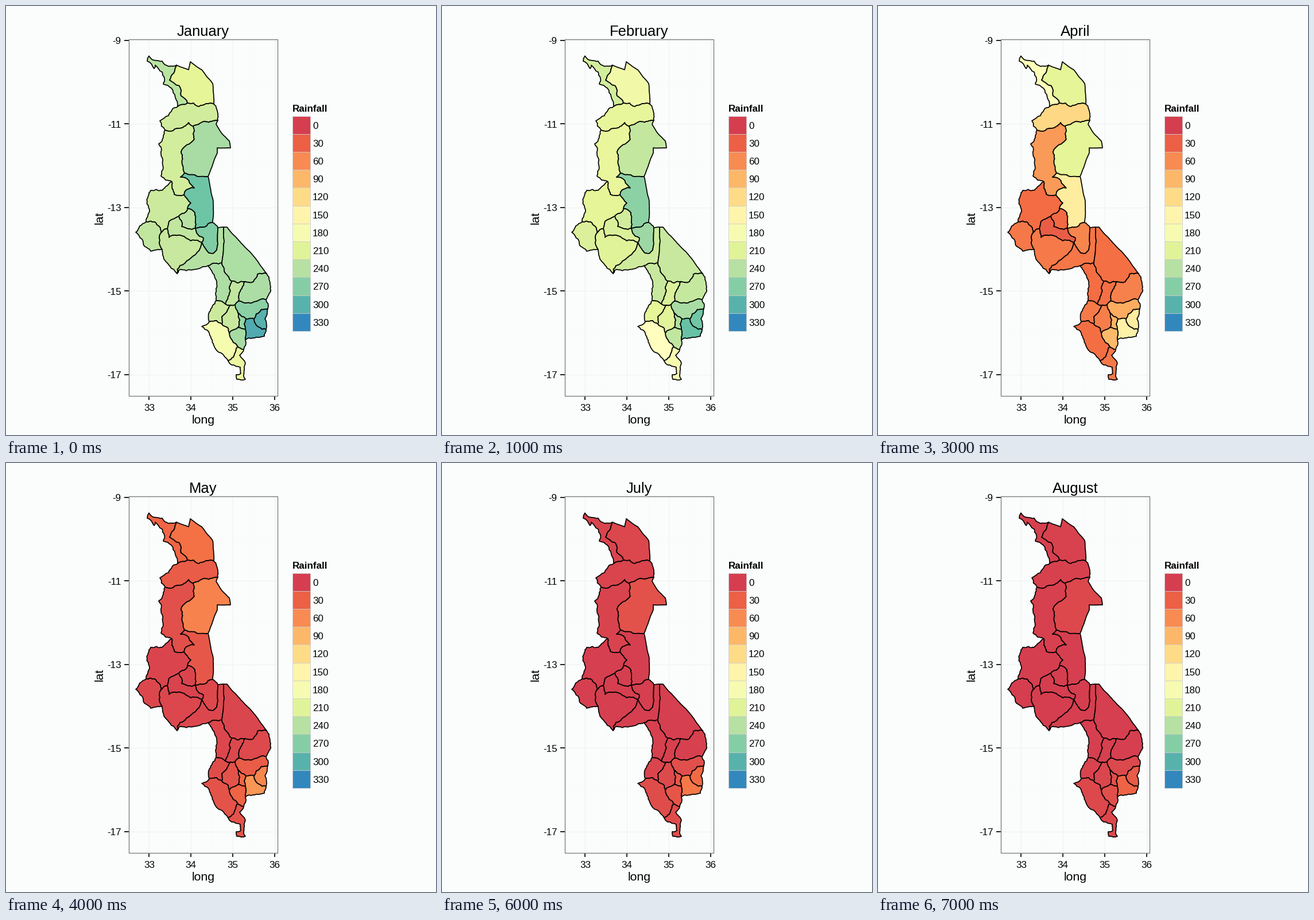
Recreate the animation shown at these times as a matplotlib script. Size 749 by 747 pixels, loop 8000 ms.

```python
import random

import numpy as np
import matplotlib.pyplot as plt
from matplotlib.animation import FuncAnimation
from matplotlib.collections import LineCollection, PolyCollection
from matplotlib.colors import LinearSegmentedColormap
from matplotlib.patches import Rectangle

W, H, DPI = 749, 747, 100
PX = 72 / DPI  # points per pixel
BACK = "#fbfdfc"
MONTHS = ["January", "February", "March", "April",
          "May", "June", "July", "August"]
SPECTRAL = ["#d53e4f", "#f46d43", "#fdae61", "#fee08b", "#ffffbf",
            "#e6f598", "#abdda4", "#66c2a5", "#3288bd"]
RAMP = LinearSegmentedColormap.from_list("rain", SPECTRAL, N=661)
MAX_RAIN = 330
LAKE = {"ad", "ek", "kl", "vt", "xw", "wv", "Bw"}  # smooth borders

rng = random.Random(7)
nodes = {}
lines = {}
shapes = []
rain = []


def place(names, *xy):
    """Name the points where borders meet, one letter each."""
    nodes.update(zip(names, zip(xy[::2], xy[1::2])))


def wiggle(p, q, rough):
    """Points from p up to, but without, q along a rugged line."""
    dx, dy = q[0] - p[0], q[1] - p[1]
    if np.hypot(dx, dy) < 5:
        return [p]
    k = rng.uniform(-rough, rough)
    mid = ((p[0] + q[0]) / 2 - dy * k, (p[1] + q[1]) / 2 + dx * k)
    return wiggle(p, mid, rough) + wiggle(mid, q, rough)


def border(ends, *xy):
    """Draw a border between two nodes through some key points."""
    pts = [nodes[ends[0]], *zip(xy[::2], xy[1::2]), nodes[ends[1]]]
    rough = 0.03 if ends in LAKE else 0.15
    line = []
    for p, q in zip(pts, pts[1:]):
        line += wiggle(p, q, rough)
    lines[ends] = line + [pts[-1]]


def edge(p, q):
    if q + p in lines:
        return lines[q + p][::-1]
    if p + q not in lines:
        border(p + q)
    return lines[p + q]


# Long, wide and strength of the wet places in the dry season
SPOTS = [(442, 560, 22, 50), (345, 248, 28, 26),
         (325, 130, 50, 14), (385, 600, 50, 15)]


def district(ring, jan, mar, apr):
    """Close a ring of nodes and work out its rain for all months."""
    shape = []
    for p, q in zip(ring, ring[1:] + ring[0]):
        shape += edge(p, q)[:-1]
    shapes.append(shape)
    x, y = np.mean(shape, axis=0)
    june = 1 + sum(amp * np.exp(-((x - cx) ** 2 + (y - cy) ** 2) / 2 / s ** 2)
                   for cx, cy, s, amp in SPOTS)
    may = june + 0.15 * (apr - june)
    south = (y - 90) / 560
    july = june * (0.5 + 0.5 * south)
    august = june * (0.2 + 0.5 * south)
    rain.append((jan, jan - 18, mar, apr, may, june, july, august))


# North
place("abcdefghij", 297, 103, 316, 169, 299, 175, 362, 171, 369, 199,
      326, 209, 277, 216, 289, 306, 310, 329, 311, 291)
place("klmnopqrstu", 352, 297, 360, 377, 330, 387, 316, 353, 301, 366,
      281, 388, 270, 395, 244, 376, 272, 424, 341, 412, 298, 466)
border("ac", 283, 105, 272, 96, 249, 87, 246, 96, 258, 109, 260, 103,
       272, 115, 274, 136, 288, 143)
border("ab", 285, 129, 302, 139)
border("ad", 318, 111, 321, 97, 341, 111, 360, 135, 361, 149)
border("db", 336, 175)
border("de", 369, 187)
border("ef", 358, 201, 338, 204)
border("fg", 318, 203, 300, 213)
border("gc", 268, 200, 283, 191)
border("fj", 328, 232, 305, 254, 308, 278)
border("ji", 304, 298, 328, 317, 311, 324)
border("ih", 293, 328)
border("hg", 270, 296, 272, 264, 266, 240)
border("ek", 366, 206, 376, 222, 389, 235, 391, 247, 368, 247, 368, 256)
border("kj", 335, 297)

# Centre
place("vwxyzAB", 369, 386, 379, 385, 376, 447, 352, 452, 393, 479,
      416, 480, 454, 466)
border("in", 322, 343)
border("op", 284, 375)
border("qr", 259, 376)
border("rh", 250, 358, 248, 330, 252, 321, 272, 321)
border("kl", 361, 340)
border("mn", 329, 360)
border("om", 306, 384)
border("pt", 284, 403, 306, 400, 322, 409)
border("tm", 344, 404, 332, 395)
border("vt", 369, 414, 367, 425, 361, 431, 353, 430)
border("rs", 226, 394, 237, 406, 252, 427)
border("sq", 268, 408)
border("su", 274, 436)
border("ut", 303, 452, 333, 429)
border("uy", 301, 460)
border("xw", 380, 410)

# South
place("CDEFGHIJKL", 453, 511, 405, 514, 399, 520, 391, 521, 382, 519,
      366, 513, 354, 550, 376, 554, 389, 570, 404, 534)
place("MNOPQRSTUV", 418, 545, 432, 545, 456, 527, 453, 563, 404, 560,
      417, 563, 417, 582, 403, 592, 414, 598, 387, 618)
border("yH", 363, 470, 365, 500)
border("Gz", 389, 500)
border("zx", 380, 460)
border("AB", 431, 480, 438, 467)
border("Bw", 430, 434, 385, 385)
border("AD", 411, 492)
border("BC", 458, 472, 461, 489)
border("CD", 432, 515)
border("ON", 436, 536)
border("FJ", 376, 541)
border("JI", 367, 548)
border("IH", 354, 533)
border("JK", 386, 560)
border("NP", 440, 559)
border("SP", 423, 578, 450, 575)
border("TK", 391, 578)
border("IV", 341, 558, 353, 567, 362, 591)
border("VT", 400, 602)
border("UV", 407, 608, 417, 622, 417, 650, 402, 650, 401, 642, 409, 640,
       408, 629, 393, 625)

# Nodes around each area, with its rain in January, March and April
district("acb", 238, 248, 172)
district("adb", 206, 283, 207)
district("cbdefg", 221, 206, 117)
district("gfjih", 220, 166, 70)
district("fekj", 249, 293, 207)
district("hinopqr", 225, 140, 40)
district("ijklmn", 284, 282, 140)
district("nom", 239, 152, 38)
district("optm", 232, 142, 27)
district("mlvt", 274, 156, 57)
district("qrs", 232, 139, 48)
district("pqsut", 228, 140, 49)
district("tuyxwv", 241, 154, 47)
district("xyHGz", 246, 143, 41)
district("xzABw", 246, 156, 43)
district("zADEFG", 232, 150, 43)
district("ABCD", 247, 190, 54)
district("DCONMLE", 267, 209, 81)
district("HGFJI", 225, 151, 49)
district("EFJKQL", 227, 153, 52)
district("LMRQ", 260, 203, 88)
district("ONP", 301, 270, 140)
district("NMRSP", 306, 275, 147)
district("KQRSUT", 250, 206, 92)
district("JIVTK", 182, 112, 42)
district("VTU", 198, 140, 48)

tints = RAMP(np.array(rain).T / MAX_RAIN)

plt.rcParams["font.family"] = "Liberation Sans"
fig = plt.figure(figsize=(W / DPI, H / DPI), dpi=DPI, facecolor=BACK)
ax = fig.add_axes([0, 0, 1, 1])
ax.set(xlim=(0, W), ylim=(H, 0))
ax.axis("off")

BASE = 21.33
SMALL = 0.8 * BASE


def label(x, y, text, size=SMALL, ha="center", **more):
    return ax.text(x, y, text, fontsize=size * PX, ha=ha, va="baseline",
                   color="black", **more)


def rules(segments, color, width):
    ax.add_collection(LineCollection(segments, colors=color,
                                     linewidths=width * PX))


# Panel, grid and axes
LEFT, RIGHT, TOP, BOTTOM = 214, 473, 58, 679
xs = [249.3 + 72.8 * i for i in range(4)]
ys = [60 + 145.4 * i for i in range(5)]
for shift, tone, width in [(0.5, "#f8faf9", 1), (0, "#f1f3f2", 1.2)]:
    gx = [x - 72.8 * shift for x in xs]
    gy = [y + 145.4 * shift for y in ys]
    rules([[(x, TOP), (x, BOTTOM)] for x in gx if x > LEFT], tone, width)
    rules([[(LEFT, y), (RIGHT, y)] for y in gy if y < BOTTOM], tone, width)

areas = PolyCollection(shapes, facecolors=tints[0], edgecolors="black",
                       linewidths=1.7 * PX, joinstyle="round", zorder=3)
ax.add_collection(areas)
ax.add_patch(Rectangle((LEFT, TOP), RIGHT - LEFT, BOTTOM - TOP, fill=False,
                       edgecolor="#808080", linewidth=1.4 * PX, zorder=4))

rules([[(x, BOTTOM), (x, BOTTOM + 7)] for x in xs], "black", 1.7)
rules([[(LEFT - 8, y), (LEFT, y)] for y in ys], "black", 1.7)
for i, x in enumerate(xs):
    label(x, 705, str(33 + i))
for i, y in enumerate(ys):
    label(200.5, y + 6.3, str(-9 - 2 * i), ha="right")
label(343.5, 727, "long", BASE)
label(169, 368.5, "lat", BASE, rotation=90, rotation_mode="anchor")
title = label(343.5, 52, MONTHS[0], 1.2 * BASE)

# Legend
label(499, 184.5, "Rainfall", ha="left", weight="bold")
KEY = 31.2
for i in range(12):
    top = 191.5 + KEY * i
    ax.add_patch(Rectangle((499, top), KEY, KEY, edgecolor="#cccccc",
                           facecolor=RAMP(30 * i / MAX_RAIN),
                           linewidth=0.8 * PX))
    label(534, top + KEY / 2 + 6.4, str(30 * i), ha="left")


def draw(month):
    areas.set_facecolor(tints[month])
    title.set_text(MONTHS[month])
    return areas, title


anim = FuncAnimation(fig, draw, frames=len(MONTHS), interval=1000,
                     repeat=True, blit=False)
plt.show()
```
